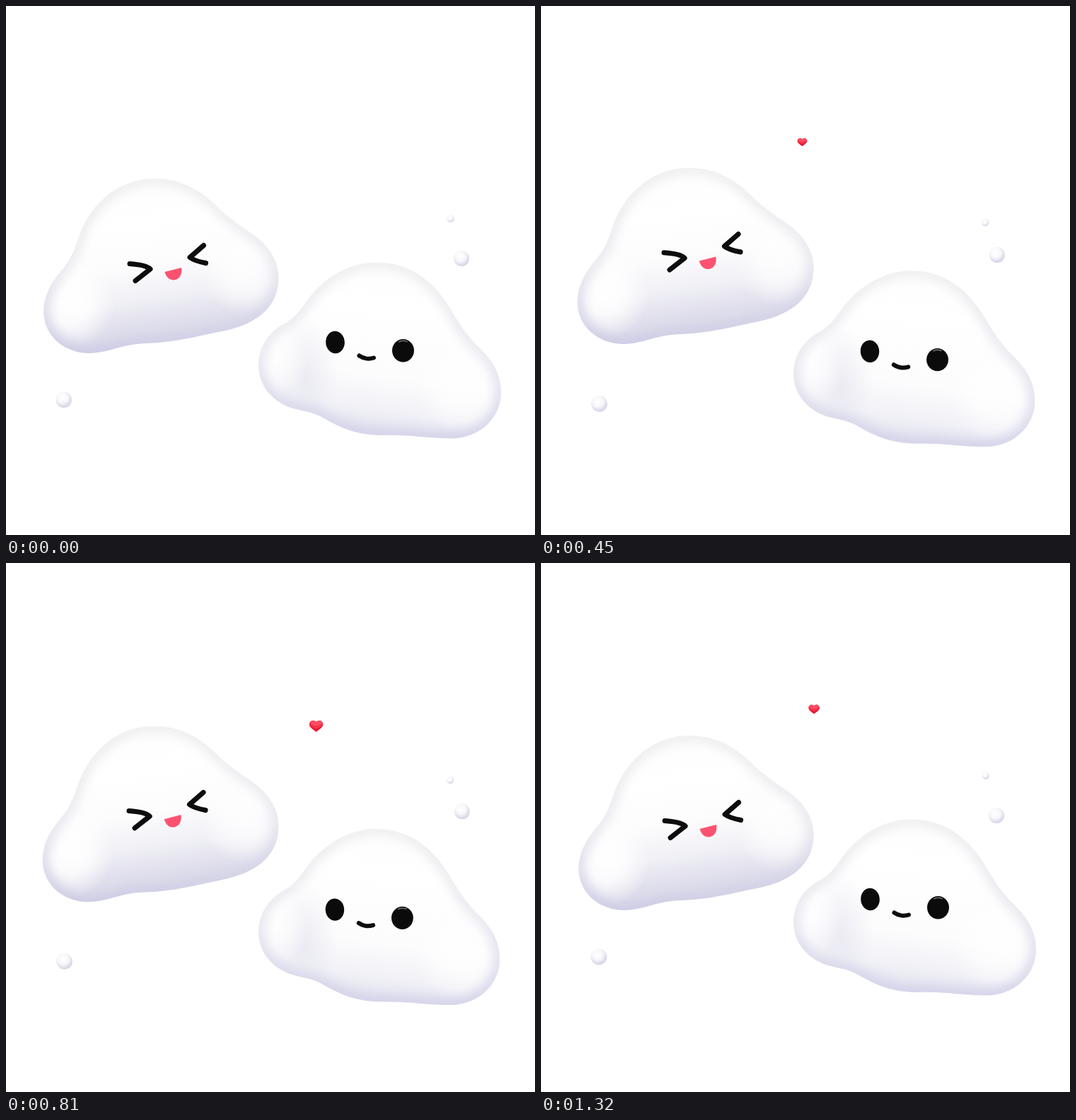
An HTML page that plays this animation: 748 by 748 pixels, repeating every 1.35 s.

```html
<!DOCTYPE html>
<html lang="en">
<head>
<meta charset="utf-8">
<title>Cloud friends</title>
<style>
html, body { margin: 0; width: 100%; height: 100%; overflow: hidden; background: #fff; }
svg { display: block; width: 100vw; height: 100vh; }
.ink { fill: none; stroke: #0d0d0e; stroke-linecap: round; stroke-linejoin: round; }
</style>
</head>
<body>
<svg viewBox="0 0 748 748">
  <defs>
    <path id="leftShape" d="M210 244C160 244 120 278 103 326C96 346 93 356 80 372C62 392 53 412 53 433C54 468 84 491 118 491C146 490 160 480 190 477.5C236 476 262 469 300 461C352 452 385 428 385.5 385C386 356 367 334 342 318C325 306 314 298 304 289C278 262 250 244 210 244Z"/>
    <path id="rightShape" d="M523 362.5C484 362.5 448 386 426 416C414 433 407 442 392 450C370 462 357 484 357 508C357 536 376 560 406 569C420 573 430 573 444 580C470 594 490 607 535 607C570 606 592 611 628 611.5C670 612 700 582 700 547C700 520 688 501 668 482C652 466 645 455 635 439C612 398 580 362.5 523 362.5Z"/>
    <path id="heartShape" d="M0-10C3-14.5 10-15 13.5-11.5C18-7.500 18-1 14 3C10 8 4 11 0 14C-4 11-10 8-14 3C-18-1-18-7.500-13.500-11.500C-10-15-3-14.500 0-10Z"/>
    <clipPath id="leftClip"><use href="#leftShape"/></clipPath>
    <clipPath id="rightClip"><use href="#rightShape"/></clipPath>
    <clipPath id="heartClip"><use href="#heartShape"/></clipPath>
    <filter id="soft" filterUnits="userSpaceOnUse" x="0" y="180" width="748" height="500"><feGaussianBlur stdDeviation="8"/></filter>
    <linearGradient id="leftFill" gradientUnits="userSpaceOnUse" x1="190" y1="250" x2="222" y2="474">
      <stop offset="0" stop-color="#fdfdfd"/><stop offset=".25" stop-color="#fff"/>
      <stop offset=".52" stop-color="#fcfcfd"/><stop offset=".72" stop-color="#f0f0f6"/>
      <stop offset=".88" stop-color="#e0dfec"/><stop offset="1" stop-color="#d8d7e8"/>
    </linearGradient>
    <linearGradient id="rightFill" gradientUnits="userSpaceOnUse" x1="555" y1="365" x2="523" y2="610">
      <stop offset="0" stop-color="#fdfdfd"/><stop offset=".25" stop-color="#fff"/>
      <stop offset=".65" stop-color="#fcfcfd"/><stop offset=".84" stop-color="#f1f1f7"/>
      <stop offset="1" stop-color="#dfdeed"/>
    </linearGradient>
    <linearGradient id="leftEdge" gradientUnits="userSpaceOnUse" x1="0" y1="244" x2="0" y2="490">
      <stop offset="0" stop-color="#ececee"/><stop offset=".5" stop-color="#e6e6ec"/><stop offset="1" stop-color="#cbcae4"/>
    </linearGradient>
    <linearGradient id="rightEdge" gradientUnits="userSpaceOnUse" x1="0" y1="362" x2="0" y2="612">
      <stop offset="0" stop-color="#ececee"/><stop offset=".5" stop-color="#e4e4ec"/><stop offset="1" stop-color="#d0cfe8"/>
    </linearGradient>
    <radialGradient id="glow">
      <stop offset="0" stop-color="#fff"/><stop offset=".45" stop-color="#fff" stop-opacity=".8"/><stop offset="1" stop-color="#fff" stop-opacity="0"/>
    </radialGradient>
    <radialGradient id="shade">
      <stop offset="0" stop-color="#dfdeec" stop-opacity=".75"/><stop offset="1" stop-color="#dfdeec" stop-opacity="0"/>
    </radialGradient>
    <radialGradient id="ball" cx=".42" cy=".36" r=".64">
      <stop offset="0" stop-color="#fff"/><stop offset=".5" stop-color="#f8f8fb"/><stop offset="1" stop-color="#d3d1e4"/>
    </radialGradient>
    <linearGradient id="heartFill" x1="0" y1="0" x2="0" y2="1">
      <stop offset="0" stop-color="#f83a52"/><stop offset=".55" stop-color="#ee1f3a"/><stop offset="1" stop-color="#e60c2b"/>
    </linearGradient>
    <g id="heart">
      <use href="#heartShape" fill="url(#heartFill)"/>
      <g clip-path="url(#heartClip)">
        <path d="M-18-16H18V-4Q10 2 0 7Q-10 2-18-4Z" fill="#f5334b"/>
        <path d="M-18-16H18V-8Q9-3 0 0Q-9-3-18-8Z" fill="#fc4c62"/>
      </g>
    </g>
  </defs>

  <circle id="dotA" r="11.300" fill="url(#ball)"/>
  <circle id="dotB" r="11" fill="url(#ball)"/>
  <circle id="dotC" r="5.200" fill="url(#ball)"/>

  <g id="left">
    <g clip-path="url(#leftClip)">
      <use href="#leftShape" fill="url(#leftFill)"/>
      <ellipse cx="92" cy="420" rx="62" ry="66" fill="url(#glow)"/>
      <ellipse cx="338" cy="376" rx="62" ry="62" fill="url(#glow)" opacity=".8"/>
      <use href="#leftShape" fill="none" stroke="url(#leftEdge)" stroke-width="15" filter="url(#soft)"/>
    </g>
    <g id="leftFace">
      <g class="ink" stroke-width="7">
        <path d="M175 364.500Q198 366 204 372L183 388.500"/>
        <path d="M279.500 338.500L260 355.500Q267 360.500 282.500 363.500"/>
      </g>
      <path d="M224.500 376L248 370C249.500 380 245 387 237 387.500C230 387.500 226 382 224.500 376Z" fill="#fc5270"/>
    </g>
  </g>

  <g id="right">
    <g clip-path="url(#rightClip)">
      <use href="#rightShape" fill="url(#rightFill)"/>
      <ellipse cx="424" cy="520" rx="46" ry="80" fill="url(#shade)" opacity=".7"/>
      <ellipse cx="386" cy="500" rx="40" ry="52" fill="url(#glow)" opacity=".55"/>
      <ellipse cx="645" cy="540" rx="66" ry="64" fill="url(#glow)" opacity=".8"/>
      <use href="#rightShape" fill="none" stroke="url(#rightEdge)" stroke-width="15" filter="url(#soft)"/>
    </g>
    <g id="rightFace">
      <ellipse cx="465.500" cy="475.500" rx="13.300" ry="15.700" transform="rotate(-4 465.500 475.500)" fill="#0b0b0c"/>
      <ellipse cx="561.500" cy="487.300" rx="15.500" ry="16.200" fill="#0b0b0c"/>
      <path d="M556 474.800Q561 472.300 567 474.500" fill="none" stroke="#66666a" stroke-width="1.800" stroke-linecap="round"/>
      <path class="ink" d="M499.500 494.500Q509 501 520 497.500" stroke-width="6"/>
    </g>
  </g>

  <use id="heart0" href="#heart"/>
  <use id="heart1" href="#heart"/>
  <use id="heart2" href="#heart"/>
</svg>
<script>
const LOOP = 1350, STEP = 30, CYCLE = 1320;
const el = id => document.getElementById(id);
const place = (id, value) => el(id).setAttribute('transform', value);

// Height of the left cloud's bob, 0 at rest and 1 at the top
const bob = [[0, 0], [180, .34], [330, .655], [570, .99], [810, .77], [1080, .205], [1320, 0]];

// Horizontal start, drift per ms and vertical offset of each heart
const hearts = [[382, -.028, 0], [433, .0155, 6], [397.4, -.027, 3.5]];

function keyAt(keys, i) {
  const n = keys.length - 1;
  const turn = Math.floor(i / n);
  const [t, v] = keys[i - turn * n];
  return [t + turn * CYCLE, v];
}

// Smooth periodic curve through the keys
function spline(keys, t) {
  let i = 0;
  while (i < keys.length - 2 && t > keys[i + 1][0]) i++;
  const [p, a, b, q] = [-1, 0, 1, 2].map(k => keyAt(keys, i + k));
  const h = b[0] - a[0], s = (t - a[0]) / h;
  const m = (b[1] - p[1]) / (b[0] - p[0]) * h;
  const n = (q[1] - a[1]) / (q[0] - a[0]) * h;
  const s2 = s * s, s3 = s2 * s;
  return a[1] * (2 * s3 - 3 * s2 + 1) + m * (s3 - 2 * s2 + s)
       + b[1] * (3 * s2 - 2 * s3) + n * (s3 - s2);
}

function drawHeart(i, t) {
  const [x0, drift, dy] = hearts[i];
  const age = t - i * LOOP / 3;
  const alive = age > 0 && age < 655;
  el('heart' + i).style.display = alive ? '' : 'none';
  if (!alive) return;
  const g = Math.min(1, age / 110);
  const width = (42.5 - .064 * age) * g * (2 - g);
  const y = 343.3 + dy - .308 * age - .00006 * age * age;
  place('heart' + i, `translate(${x0 + drift * age} ${y}) scale(${width / 34})`);
}

function draw(t) {
  const up = spline(bob, t);
  const down = (1 - Math.cos(2 * Math.PI * t / CYCLE)) / 2;

  place('left', `matrix(${1 + .006 * up} 0 0 ${1 + .0101 * up} ${-2.31 * up} ${-19.96 * up})`);
  place('leftFace', `translate(0 ${-1.8 * up})`);
  place('right', `matrix(${1 - .006 * down} 0 0 1 ${2.14 * down} ${15.4 * down})`);
  place('rightFace', `translate(0 ${1.2 * down})`);

  place('dotA', `translate(${81.7 + down} ${556.7 + 7.6 * down})`);
  place('dotB', `translate(${644 + down} ${357 - 6.6 * down})`);
  place('dotC', `translate(${628.6 - .6 * down} ${300.5 + 7.2 * down})`);

  hearts.forEach((_, i) => drawHeart(i, t));
}

const start = performance.now();
function tick(now) {
  const t = Math.max(0, now - start) % LOOP;
  draw(Math.floor(t / STEP) * STEP);
  requestAnimationFrame(tick);
}
draw(0);
requestAnimationFrame(tick);
</script>
</body>
</html>
```
